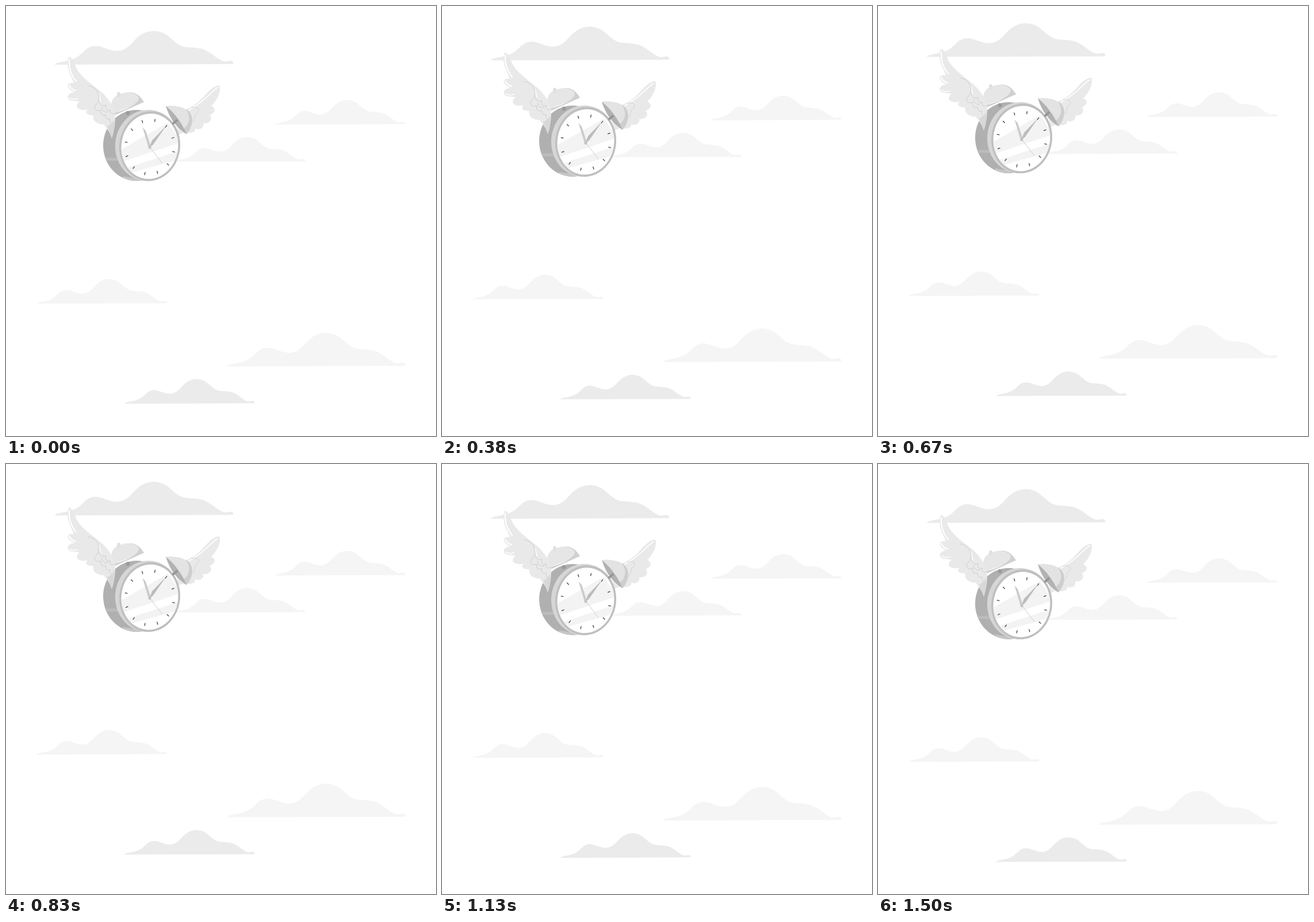
Animation of 748 by 748 pixels, one loop 1.54 s. Source, as an HTML page:

```html
<!DOCTYPE html>
<html lang="en">
<head>
<meta charset="utf-8">
<title>Flying alarm clock</title>
<style>
  html, body { margin: 0; width: 100%; height: 100%; overflow: hidden; background: #fff; }
  svg { display: block; width: 100%; height: 100%; }
  .line { fill: none; stroke-linecap: round; stroke-linejoin: round; }
</style>
</head>
<body>
<svg viewBox="0 0 748 748">
  <defs>
    <path id="cloud" d="M0 58C3 54.500 10 53.500 19 52C36 49 44 42 52 34C61 25 71 24 81 27C93 31 101 35 112 34C128 32 135 18 145 10C160-3 181-4 196 7C209 17 215 26 229 27.500C246 29 256 28 269 36.500C279 43 287 50.500 295 52.500C300 53 305 50 309 52C312 55 311 57 309 57Z"/>
    <clipPath id="glass"><ellipse cx="250" cy="244" rx="49.300" ry="57" transform="rotate(8 250 244)"/></clipPath>
    <clipPath id="drum"><ellipse cx="227" cy="242.500" rx="58" ry="61.800"/></clipPath>
  </defs>
  <g id="scene">
    <g id="clouds"></g>

    <g id="rightWing">
      <path fill="#e9e9e9" d="M371 138C374 145 371 160 357 174C365 177 366 185 354 190C360 194 357 205 343 204C345 210 339 217 329 213C331 220 320 223 312 219L300 224L293 185C307 181 319 179 328 172C348 158 353 141 371 138Z"/>
      <path class="line" stroke="#fff" stroke-width="1.800" d="M368 142C358 147 349 164 318 181"/>
      <path class="line" stroke="#d2d2d2" d="M322 177C334 174 340 181 330 188C327 192 330 197 325 202"/>
    </g>

    <ellipse cx="227" cy="242.500" rx="58" ry="61.800" fill="#b0b0b0"/>
    <g clip-path="url(#drum)">
      <path fill="#bcbcbc" d="M165 264H198V269H165Z"/>
      <path fill="#c6c6c6" d="M203 296L245 303V310H208Z"/>
    </g>

    <circle cx="212" cy="186" r="3.500" fill="#9b9b9b"/>
    <path fill="#e6e6e6" d="M187 186C179 171 184 157 199 153C215 147 229 152 240 167Z"/>
    <path fill="#d0d0d0" d="M211 150.500C226 149 233 156 240 167L189 190L187 186C211 181 231 169 231 160C230 155 222 151 211 150.500Z"/>
    <ellipse cx="196" cy="154" rx="3" ry="4.500" fill="#e0e0e0"/>

    <path fill="#e9e9e9" d="M110 88C105 93 106 108 113 122L118 134C110 133 106 136 108 141C110 145 114 148 119 150C109 151 105 157 109 162C114 166 121 165 128 166C119 174 123 181 137 181L143 180C136 184 139 190 152 190C150 200 159 206 170 206C176 214 181 219 184 230C189 215 190 203 190 188C188 176 178 160 165 149C147 134 126 121 120 102C117 94 114 90 110 88Z"/>
    <path class="line" stroke="#fff" stroke-width="2.200" d="M110 93C109 107 114 121 122 131M110 138Q114 146 121 147"/>
    <path class="line" stroke="#fff" stroke-width="1.500" d="M111 160Q117 164 125 161M162 153L165 167"/>
    <path class="line" stroke="#cdcdcd" d="M143 139C150 139 159 145 161 154C163 163 160 169 154 174C153 180 158 184 165 181C163 187 167 192 173 189C173 195 177 199 181 196C180 201 183 206 187 206M162 166C165 174 169 175 174 172C172 180 177 184 181 180C180 186 184 190 188 187M166 176C167 182 172 186 177 184"/>
    <path fill="#d8d8d8" d="M176 209Q183 207 188 198Q190 215 184 230Z"/>

    <ellipse cx="246.500" cy="242.500" rx="56.500" ry="62" fill="#d6d6d6" transform="rotate(5 246 242)"/>
    <ellipse cx="250" cy="243.800" rx="52.800" ry="60.800" fill="#bfbfbf" transform="rotate(8 250 244)"/>
    <ellipse cx="250" cy="244" rx="49.300" ry="57" fill="#fff" transform="rotate(8 250 244)"/>
    <path clip-path="url(#glass)" fill="#f3f3f3" d="M198 251L282 203L304 237L202 271ZM206 283L304 251V266L214 291Z"/>
    <g id="ticks" stroke="#414141" stroke-width="1.300" transform="rotate(8 250.300 245.300)"></g>
    <path fill="#cbcbcb" d="M237.500 211L243 217L252 245L248 246Z"/>
    <path fill="#bcbcbc" d="M279 208L256 241L249 247L254 234Z"/>
    <path class="line" stroke="#cdcdcd" d="M249 244L272 274"/>
    <circle cx="250" cy="246" r="2.500" fill="#c2c2c2"/>

    <path fill="#e3e3e3" d="M278 174C292 172 309 175 319 184C327 194 325 211 314 223Z"/>
    <path fill="#cecece" d="M312 179C329 187 326 210 314 223L309 213C320 206 322 190 312 179Z"/>
    <path fill="#b2b2b2" d="M278 174C291 184 306 202 314 223C298 213 285 197 278 174Z"/>
    <path class="line" stroke="#969696" stroke-width="4" stroke-linecap="butt" d="M291 204L297 199"/>
  </g>
</svg>
<script>
  const $ = id => document.getElementById(id);

  // x, y, scale, fill
  const clouds = [
    [84.5, 44, 1, '#ebebeb'], [384, 569, 1, '#f5f5f5'],
    [467.5, 164, .73, '#f5f5f5'], [293.5, 228.500, .73, '#f5f5f5'],
    [53.5, 475.5, .73, '#f5f5f5'], [205.5, 649.5, .73, '#ebebeb']
  ];
  $('clouds').innerHTML = clouds.map(([x, y, s, fill]) =>
    `<use href="#cloud" fill="${fill}" transform="translate(${x} ${y}) scale(${s})"/>`).join('');

  let ticks = '';
  for (let i = 0; i < 12; i++) {
    const a = (3 + 30 * i) * Math.PI / 180;
    const point = r => `${250.3 + 42 * r * Math.cos(a)} ${245.3 + 47 * r * Math.sin(a)}`;
    ticks += `<path d="M${point(.945)}L${point(1.055)}"/>`;
  }
  $('ticks').innerHTML = ticks;

  // Linear bob in 24 fps steps: up to a sharp turn, then down again
  function draw() {
    const step = Math.floor(performance.now() % 1540 * .024 + .1);
    const lift = Math.min(.84 * step, .8 * (35.5 - step));
    $('scene').setAttribute('transform', `translate(0 ${-lift})`);
    requestAnimationFrame(draw);
  }
  draw();
</script>
</body>
</html>
```
